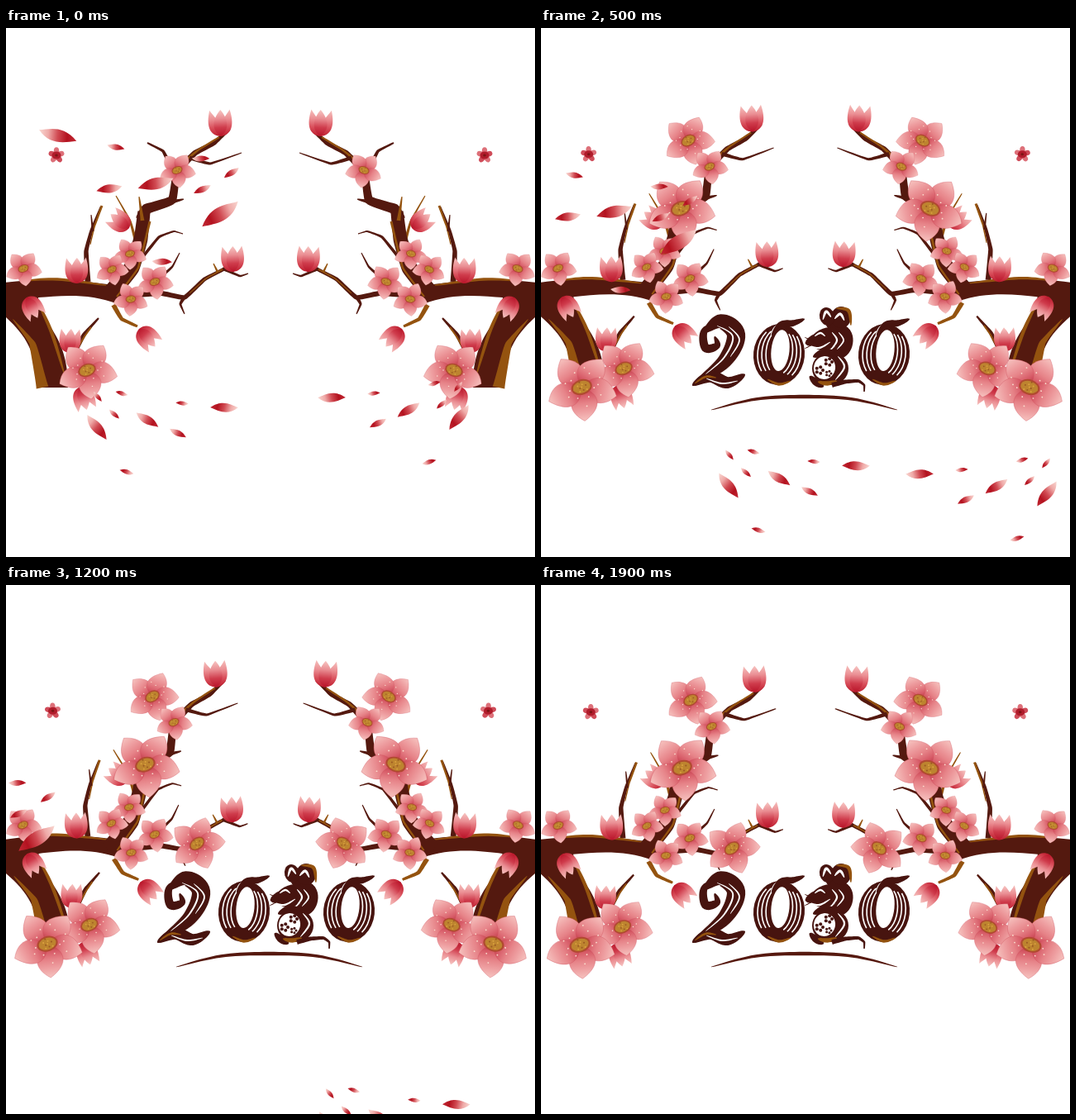
These frames come from a looping animation (640 px wide and 640 px high, 2000 ms). An HTML page with a canvas:

```html
<!DOCTYPE html>
<html lang="en">
<head>
<meta charset="utf-8">
<title>Plum blossom greeting</title>
<style>
html, body { margin: 0; width: 100%; height: 100%; overflow: hidden; background: #fff; }
canvas { display: block; width: 100vw; height: 100vh; object-fit: contain; }
</style>
</head>
<body>
<canvas id="stage" width="640" height="640"></canvas>
<script>
const ctx = document.getElementById('stage').getContext('2d');
const LOOP = 2000, STEP = 100, DEG = Math.PI / 180;
const BARK = '#54190f', GOLD = '#94530f', INK = '#47140f', WHITE = '#fff';
const clamp = v => Math.max(0, Math.min(1, v));

function at(x, y, angle, sx, sy, draw) {
  ctx.save();
  ctx.translate(x, y);
  ctx.rotate(angle * DEG);
  ctx.scale(sx, sy);
  draw();
  ctx.restore();
}

function dot(x, y, rx, ry, color, angle = 0) {
  ctx.fillStyle = color;
  ctx.beginPath();
  ctx.ellipse(x, y, rx, ry, angle * DEG, 0, 7);
  ctx.fill();
}

// Gradient from (x0, y0) to (x1, y1) with evenly spaced colours
function blend(x0, y0, x1, y1, ...colors) {
  const g = ctx.createLinearGradient(x0, y0, x1, y1);
  colors.forEach((c, i) => g.addColorStop(i / (colors.length - 1), c));
  return g;
}

// Hermite spline; bend 0 gives straight segments, 0.5 a smooth curve
function spline(a, b, c, d, u, bend) {
  const s = u * u * (3 - 2 * u);
  return b + (c - b) * s + bend * u * (1 - u) * ((c - a) * (1 - u) - (d - b) * u);
}

// Band of varying width along x, y pairs
function ribbon(color, xy, width, bend) {
  const last = xy.length / 2 - 1, count = last * 10, pts = [];
  const get = (i, k) => xy[2 * Math.max(0, Math.min(last, i)) + k];
  for (let j = 0; j <= count; j++) {
    const i = Math.min(last - 1, Math.floor(j / 10)), u = j / 10 - i;
    pts.push([0, 1].map(k => spline(get(i - 1, k), get(i, k), get(i + 1, k), get(i + 2, k), u, bend)));
  }
  const near = [], far = [];
  pts.forEach(([x, y], j) => {
    const a = pts[Math.max(0, j - 1)], b = pts[Math.min(count, j + 1)];
    const dx = b[0] - a[0], dy = b[1] - a[1], h = width(j / count) / 2 / (Math.hypot(dx, dy) || 1);
    near.push([x + dy * h, y - dx * h]);
    far.unshift([x - dy * h, y + dx * h]);
  });
  ctx.fillStyle = color;
  ctx.beginPath();
  near.concat(far).forEach(p => ctx.lineTo(...p));
  ctx.fill();
}

const twig = (color, from, to, ...xy) => ribbon(color, xy, u => from + (to - from) * u, 0.15);
const brush = (color, wide, ...xy) =>
  ribbon(color, xy, u => 0.3 + wide * Math.max(0, Math.sin(Math.PI * u)) ** 0.7, 0.5);

function flower(x, y, r, turn = 0, size = 1) {
  if (size <= 0) return;
  at(x, y, turn, r * size, r * size * 0.94, () => {
    for (let i = 0; i < 5; i++)
      at(0, 0, i * 70 - 130, 1, 1, () => {
        ctx.fillStyle = blend(0, 0, 1, 0, '#b8303f', '#d75c68', '#e68388', '#ee9fa1', '#f5bebb');
        ctx.beginPath();
        ctx.moveTo(0, 0);
        ctx.bezierCurveTo(0.25, -0.5, 0.68, -0.55, 1.04, 0.04);
        ctx.bezierCurveTo(0.72, 0.5, 0.28, 0.46, 0, 0);
        ctx.fill();
        ctx.strokeStyle = 'rgba(205,75,90,.4)';
        ctx.lineWidth = 0.02;
        ctx.stroke();
      });
    const speck = (i, d, size, color) =>
      dot(d * Math.cos(i * 2.4), d * Math.sin(i * 2.4), size, size, color);
    if (r > 28) for (let i = 0; i < 14; i++) speck(i, 0.36 + 0.12 * (i % 3), 0.022, '#fbe0d0');
    dot(0, 0, 0.31, 0.23, '#b04a30', -25);
    dot(0, 0, 0.26, 0.18, '#bd842f', -25);
    for (let i = 0; i < 9; i++) speck(i, 0.06 * Math.sqrt(i), 0.025, i % 2 ? '#9b5922' : '#dba23f');
  });
}

function smallFlower(x, y, r) {
  for (let i = 0; i < 5; i++)
    at(x, y, i * 72 - 18, r, r * 0.85, () => dot(0.52, 0, 0.46, 0.38, i % 2 ? '#cf4c59' : '#dd7079'));
  dot(x, y, r * 0.55, r * 0.45, '#b01c2b');
  dot(x, y, r * 0.18, r * 0.15, '#7c1515');
}

function bud(x, y, h, turn) {
  at(x, y, turn, h, h, () => {
    ctx.fillStyle = blend(0, 0, 0, -1, '#bd1c2e', '#d9505c', '#ec9296', '#f5bfbc');
    for (const s of [1, -1]) {
      ctx.beginPath();
      ctx.moveTo(0, 0);
      ctx.bezierCurveTo(-0.42 * s, -0.04, -0.54 * s, -0.42, -0.38 * s, -1);
      ctx.bezierCurveTo(-0.22 * s, -0.72, 0.2 * s, -0.4, 0, 0);
      ctx.fill();
    }
    ctx.fillStyle = blend(0, 0, 0, -1, '#b81429', '#cf3c4c', '#ea8f94', '#f7c6c3');
    ctx.beginPath();
    ctx.moveTo(0, 0);
    ctx.bezierCurveTo(-0.36, -0.25, -0.3, -0.65, 0.03, -1);
    ctx.bezierCurveTo(0.3, -0.65, 0.36, -0.25, 0, 0);
    ctx.fill();
  });
}

function trunk() {
  ctx.fillStyle = BARK;
  ctx.beginPath();
  ctx.moveTo(-30, 312);
  ctx.bezierCurveTo(20, 304, 60, 301, 130, 311);
  ctx.lineTo(136, 334);
  ctx.bezierCurveTo(100, 320, 65, 324, 39, 326);
  ctx.bezierCurveTo(42, 360, 76, 370, 75, 435);
  ctx.lineTo(37, 435);
  ctx.bezierCurveTo(38, 380, 14, 360, -30, 325);
  ctx.fill();
  twig(GOLD, 0, 15, 8, 352, 32, 382, 44, 435);
  brush(GOLD, 4, 38, 331, 55, 368, 71, 420);
  brush(GOLD, 3, 20, 306, 62, 304, 127, 312);
}

function wood() {
  twig(BARK, 7, 2, 99, 307, 97, 270, 104, 243, 115, 216);
  twig(GOLD, 1, 3, 102, 262, 107, 240, 116, 215);
  twig(BARK, 3, 1, 105, 246, 103, 226);
  twig(GOLD, 4, 1, 157, 258, 150, 233, 133, 203);
  twig(BARK, 4, 1, 163, 280, 185, 253, 203, 246, 214, 249);
  twig(BARK, 4, 1, 183, 305, 201, 289, 210, 272);
  twig(BARK, 7, 4, 136, 324, 188, 321, 216, 326, 240, 304, 265, 291);
  twig(BARK, 4, 1, 262, 291, 283, 300, 293, 297);
  twig(GOLD, 1, 2, 222, 321, 242, 303, 262, 292);
  twig(GOLD, 3, 1, 256, 295, 251, 285);
  twig(BARK, 5, 1, 216, 325, 211, 334, 216, 346);
  twig(GOLD, 6, 3, 130, 335, 140, 352, 159, 361);
  twig(BARK, 7, 2, 80, 397, 95, 370, 112, 351);
  twig(GOLD, 2, 2, 84, 392, 95, 373, 103, 362);
  trunk();
  twig(BARK, 21, 15, 124, 324, 152, 290, 163, 255, 167, 222);
  twig(BARK, 15, 8, 164, 232, 170, 219, 201, 208, 207, 165);
  twig(GOLD, 2, 3, 134, 325, 160, 290, 174, 234);
  twig(GOLD, 5, 1, 165, 233, 161, 204);
  twig(BARK, 6, 1, 198, 211, 215, 207);
  twig(BARK, 8, 4, 212, 168, 229, 151, 252, 139, 270, 122);
  twig(GOLD, 3, 2, 215, 162, 232, 148, 258, 132);
  twig(BARK, 5, 1, 222, 157, 247, 164, 285, 151);
  twig(BARK, 5, 2, 200, 169, 190, 149, 171, 139);
}

function tree(t) {
  const grow = start => clamp((t - start) / 300);
  ctx.save();
  ctx.translate(0, 310);
  ctx.rotate(-0.03 * Math.sin(Math.PI * t / LOOP));
  ctx.translate(0, -310);
  wood();
  bud(260, 131, 32, -3);
  bud(86, 309, 31, -2);
  bud(149, 242, 28, -55);
  bud(275, 295, 31, -3);
  bud(161, 364, 29, 136);
  bud(25, 326, 28, 150);
  bud(77, 393, 29, 2);
  bud(90, 434, 29, 163);
  smallFlower(61, 154, 10);
  flower(182, 140, 31, -8, grow(200));
  flower(207, 172, 22);
  flower(150, 273, 20, 8);
  flower(128, 292, 20, -4);
  flower(180, 307, 22);
  flower(151, 328, 21, 12);
  flower(21, 291, 22);
  flower(98, 414, 36);
  flower(46.5, 435.5, 42, 4, grow(0));
  flower(171, 222, 41, 2, grow(200));
  flower(231, 319.5, 33, -14, grow(500));
  ctx.restore();
}

function two() {
  brush(INK, 10, 210, 373, 213, 384, 199, 387, 198, 366, 220, 356);
  brush(INK, 22, 197, 368, 217, 355, 236, 371, 222, 403, 183, 433);
  brush(INK, 15, 183, 432, 205, 422, 226, 429, 247, 419);
  brush(WHITE, 1.8, 213, 360, 232, 373, 222, 398, 199, 419);
  brush(WHITE, 1.6, 227, 361, 240, 377, 229, 398);
  brush(WHITE, 1.6, 200, 424, 219, 430, 238, 427);
  brush(GOLD, 2.5, 186, 430, 199, 422, 212, 423);
}

function zero(x) {
  at(x, 395, 6, 1, 1, () => {
    ctx.fillStyle = INK;
    ctx.beginPath();
    ctx.ellipse(0, 0, 31, 37, 0, 0, 7);
    ctx.ellipse(1, -5, 11, 25, 0, 0, 7);
    ctx.fill('evenodd');
    ctx.strokeStyle = WHITE;
    ctx.lineWidth = 1.6;
    for (const side of [0, 180])
      for (let k = 0; k < 3; k++) {
        ctx.beginPath();
        ctx.ellipse(0, -3 + k, 16 + 5 * k, 28 + 3 * k, 0, (side - 55 + 6 * k) * DEG, (side + 62 - 8 * k) * DEG);
        ctx.stroke();
      }
  });
  brush(WHITE, 3, x + 9, 357, x - 4, 362, x - 10, 372);
  brush(INK, 8, x + 31, 352, x + 17, 357, x + 2, 359, x - 9, 372);
  brush(GOLD, 3, x - 14, 425, x, 431, x + 14, 427);
}

function blossom(x, y, r) {
  for (let a = 0; a < 360; a += 72)
    dot(x + r * Math.cos(a * DEG), y + r * Math.sin(a * DEG), r * 0.5, r * 0.5, INK);
}

function mouse() {
  brush(INK, 20, 345, 358, 366, 370, 363, 390, 341, 400);
  dot(363, 350, 12, 13, INK);
  brush(GOLD, 4, 357, 339, 372, 342, 375, 360);
  brush(WHITE, 3, 355, 352, 362, 346, 367, 354);
  dot(346, 349, 9, 11, INK, -15);
  brush(WHITE, 3, 341, 353, 345, 343, 351, 350);
  dot(345, 376, 19, 13, INK, -18);
  brush(INK, 13, 345, 370, 332, 377, 320, 382);
  brush(WHITE, 2, 331, 373, 338, 369, 344, 373);
  brush(WHITE, 2, 326, 385, 337, 387, 350, 380);
  brush(WHITE, 2, 352, 368, 358, 378, 350, 390);
  brush(WHITE, 1.6, 360, 368, 366, 378, 358, 389);
  for (let k = 0; k < 3; k++) brush(INK, 0.8, 332, 381, 319, 374 + 7 * k);
  dot(350, 412, 22, 20, INK);
  dot(343, 411, 13, 14, WHITE, 15);
  blossom(348, 404, 4);
  blossom(337, 414, 4);
  blossom(348, 418, 3);
  brush(INK, 9, 329, 398, 345, 392, 362, 398);
  brush(WHITE, 2, 359, 397, 367, 410, 356, 426);
  brush(INK, 8, 325, 421, 333, 429, 342, 434);
  brush(GOLD, 5, 335, 428, 346, 430, 358, 427);
  twig(INK, 6, 1.5, 352, 432, 368, 428, 384, 427, 391, 432, 391, 440);
}

function title(t) {
  if (t === 0) return;
  // overshooting pop around the centre of the lettering
  const u = clamp(t / 300) - 1, size = 1 + 3 * u ** 3 + 2 * u * u;
  at(315, 400, 0, size, size, () => {
    ctx.translate(-315, -400);
    two();
    zero(288);
    zero(415);
    mouse();
    brush('#56190f', 4, 206, 462, 260, 449, 318.5, 446, 377, 449, 431, 462);
  });
}

function petal(x, y, len, angle, flip) {
  at(x, y, angle, len * flip, len * 0.36, () => {
    ctx.fillStyle = blend(-0.5, 0, 0.5, 0, '#f9d8d2', '#efaaa8', '#d04a52', '#b3121f', '#c22a35');
    ctx.beginPath();
    ctx.moveTo(-0.5, -0.3);
    ctx.bezierCurveTo(-0.25, -0.35, 0.1, -0.85, 0.5, 0.3);
    ctx.bezierCurveTo(0.15, 0.5, -0.2, 0.75, -0.5, -0.3);
    ctx.fill();
  });
}

// Place and length of each petal, relative to the largest
const SWARM = [
  [0, 0, 37], [30, -41, 15], [21, -16, 16], [103, -29, 15], [61, -9, 31],
  [154, -24, 33], [98, 7, 22], [36, 54, 17], [1, -37, 15]
];

function swarm(x, y, turn, sx, sy) {
  at(x, y, turn, sx, sy, () => SWARM.forEach(([px, py, len], i) =>
    petal(px, py, len, 10 + 30 * Math.exp(-px / 60), i % 2 ? -1 : 1)));
}

function petals(t) {
  const s = t / 100;
  swarm(259 - 18.5 * s, 225 + 6.8 * s, 17, -1.4, 1.4);
  swarm(110 + 23.4 * s, 483 + 14.1 * s, 0, 1, 1);
  swarm(548 + 12.8 * s, 471 + 18.5 * s, 0, -1, 1);
}

function render(t) {
  ctx.fillStyle = WHITE;
  ctx.fillRect(0, 0, 640, 640);
  tree(t);
  at(640, 0, 0, -1, 1, () => tree(t));
  title(t);
  petals(t);
}

let shown = -1;
const begin = performance.now();
function tick() {
  const t = Math.floor((performance.now() - begin) % LOOP / STEP) * STEP;
  if (t !== shown) render(shown = t);
  requestAnimationFrame(tick);
}
tick();
</script>
</body>
</html>
```
